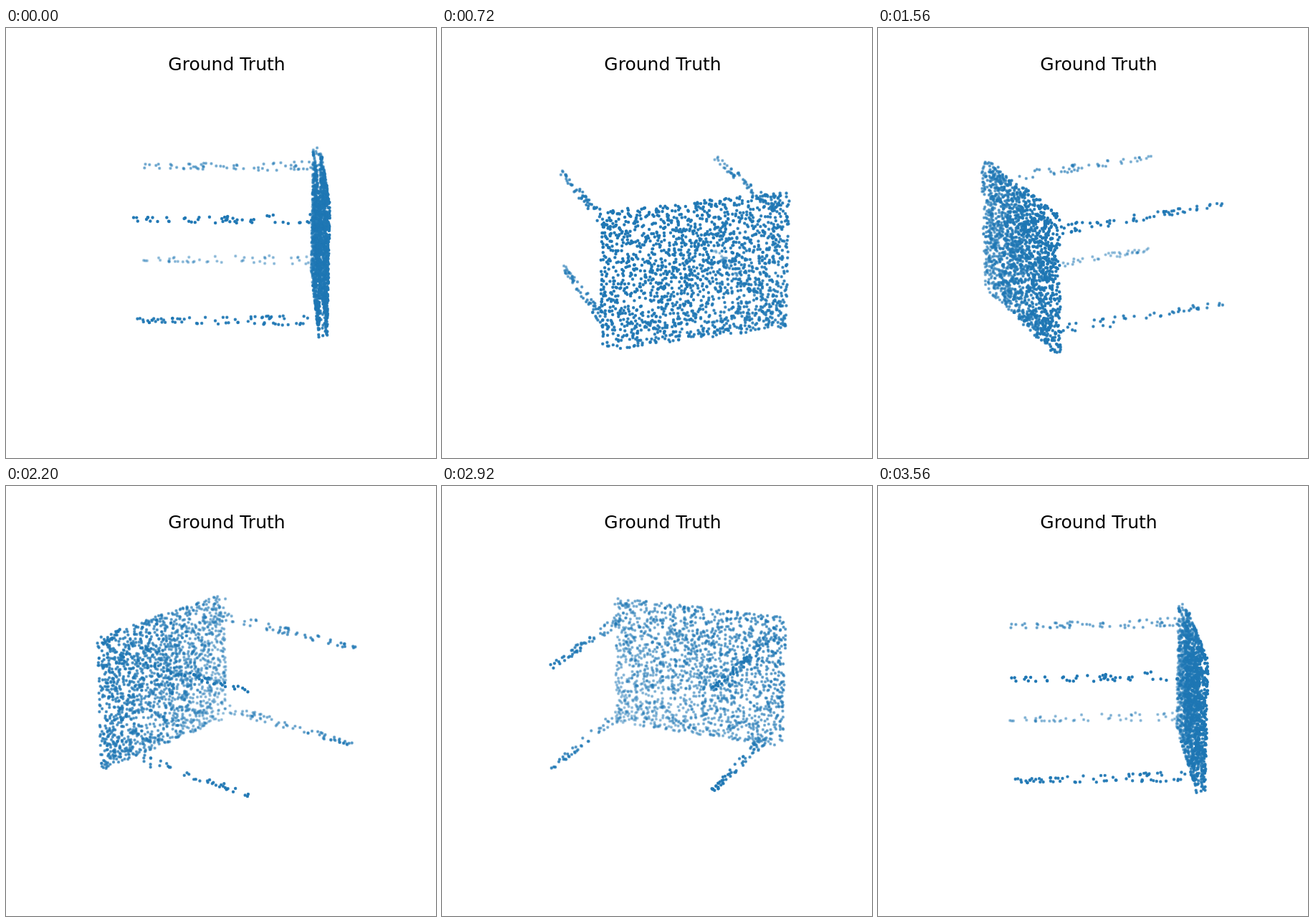
These frames come from a looping animation (600 px wide and 600 px high, 3600 ms). An HTML page with a canvas:

```html
<!DOCTYPE html>
<html lang="en">
<head>
<meta charset="utf-8">
<title>Rotating point cloud</title>
<style>
  html, body { margin: 0; width: 100%; height: 100%; overflow: hidden; background: #fff; }
  canvas { display: block; position: absolute; left: 0; top: 0; }
  h1 {
    position: absolute; left: 208px; top: 36px; width: 200px; margin: 0;
    font: 25px/30px "DejaVu Sans", sans-serif; text-align: center; color: #000;
  }
</style>
</head>
<body>
<canvas width="600" height="600"></canvas>
<h1>Ground Truth</h1>
<script>
const ctx = document.querySelector('canvas').getContext('2d');
const STEP_MS = 40, STEPS = 90;
const ELEVATION = 20 * Math.PI / 180;
const COS_E = Math.cos(ELEVATION), SIN_E = Math.sin(ELEVATION);
const CENTER = { x: 313.7, y: 296.7 }, FOCAL = 2497, DISTANCE = 10;
const HALF = 0.52, HALF_HEIGHT = 0.385, THICKNESS = 0.044;
const LEG_B = 0.466, LEG_Z = 0.288;
const DOT_RADIUS = 1.2, OUTLINE = 2.08;

let seed = 7;
function random() {
  seed = (seed + 0x6D2B79F5) | 0;
  let n = Math.imul(seed ^ (seed >>> 15), seed | 1);
  n ^= n + Math.imul(n ^ (n >>> 7), n | 61);
  return ((n ^ (n >>> 14)) >>> 0) / 4294967296;
}
const spread = half => (random() * 2 - 1) * half;
const side = half => random() < 0.5 ? -half : half;

// Points are [a, b, z]: a along the legs, b across the table top, z upwards.
const points = [];

function addTop(faceCount, rimCount) {
  const mid = HALF - THICKNESS / 2;
  for (let i = 0; i < faceCount; i++)
    points.push([mid + side(THICKNESS / 2), spread(HALF), spread(HALF_HEIGHT)]);
  for (let i = 0; i < rimCount; i++) {
    const a = mid + spread(THICKNESS / 2);
    points.push(random() < 0.57
      ? [a, spread(HALF), side(HALF_HEIGHT)]
      : [a, side(HALF), spread(HALF_HEIGHT)]);
  }
}

// Legs taper towards the foot.
function addLeg(b, z, count) {
  for (let i = 0; i < count; i++) {
    const t = random(), r = 0.009 + 0.014 * t;
    const a = -0.515 + t * 0.99;
    const [db, dz] = random() < 0.5 ? [side(r), spread(r)] : [spread(r), side(r)];
    points.push([a, b + db, z + dz]);
  }
}

addTop(1740, 80);
addLeg(-LEG_B, LEG_Z, 62);
addLeg(LEG_B, LEG_Z, 52);
addLeg(-LEG_B, -LEG_Z, 46);
addLeg(LEG_B, -LEG_Z, 68);

function project([a, b, z], cos, sin) {
  const right = a * cos - b * sin;
  const toward = b * cos + a * sin;
  const near = toward * COS_E + z * SIN_E;
  const scale = FOCAL / (DISTANCE - near);
  return {
    x: CENTER.x + right * scale,
    y: CENTER.y - (z * COS_E - toward * SIN_E) * scale,
    near
  };
}

function draw(step) {
  const angle = step / STEPS * 2 * Math.PI;
  const cos = Math.cos(angle), sin = Math.sin(angle);
  const dots = points.map(p => project(p, cos, sin)).sort((p, q) => p.near - q.near);
  const far = dots[0].near, range = dots[dots.length - 1].near - far;

  ctx.clearRect(0, 0, 600, 600);
  ctx.fillStyle = ctx.strokeStyle = '#1f77b4';
  ctx.lineWidth = OUTLINE;
  for (const { x, y, near } of dots) {
    ctx.globalAlpha = 0.3 + 0.7 * (near - far) / range;
    ctx.beginPath();
    ctx.arc(x, y, DOT_RADIUS, 0, 2 * Math.PI);
    ctx.fill();
    ctx.stroke();
  }
}

let shown = -1;
function tick() {
  const step = Math.floor(performance.now() / STEP_MS) % STEPS;
  if (step !== shown) draw(shown = step);
  requestAnimationFrame(tick);
}
tick();
</script>
</body>
</html>
```
